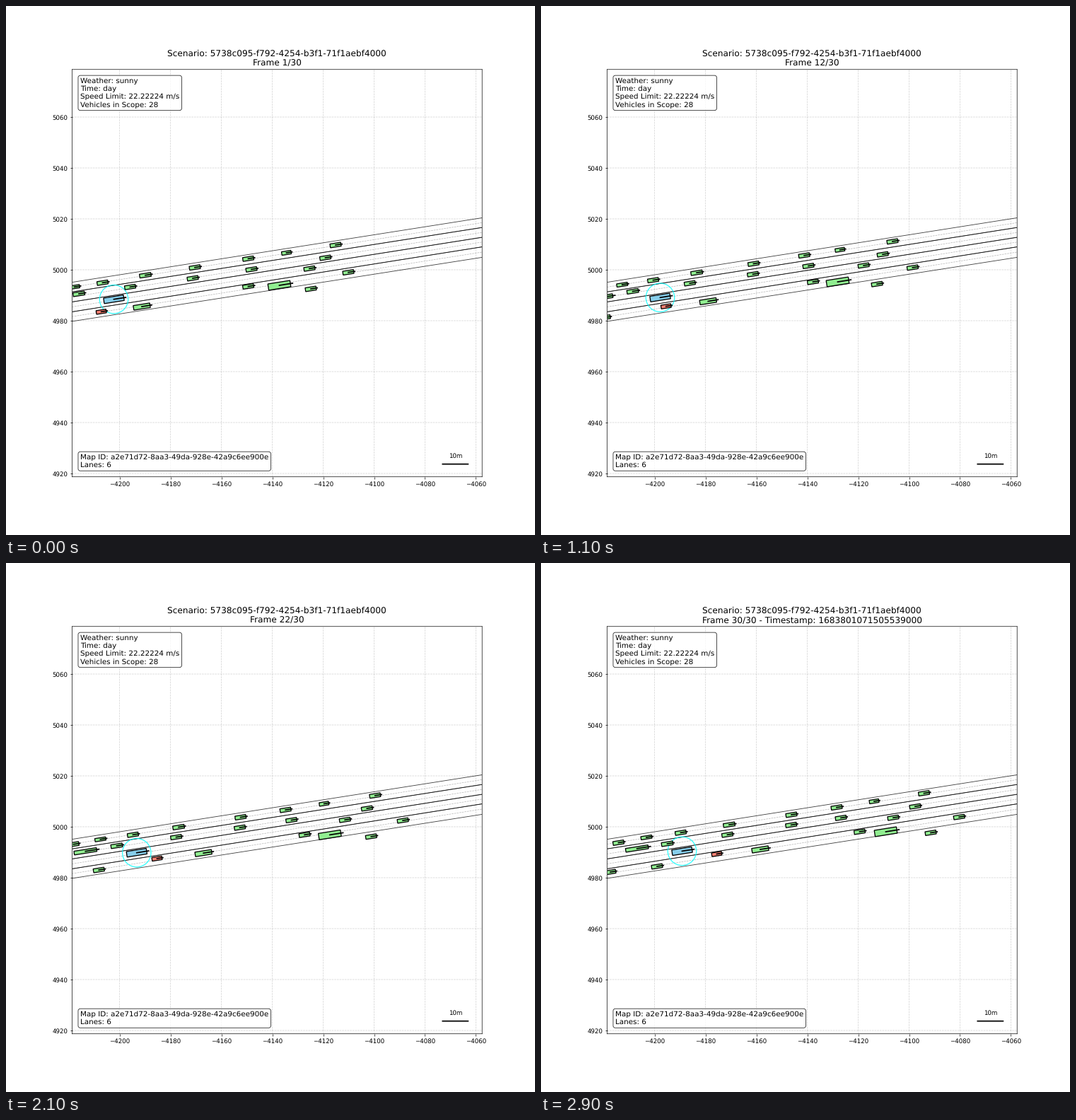
A matplotlib script that plays this animation: 748x748 px, repeating every 3000 ms.

```python
import numpy as np
import matplotlib.pyplot as plt
from matplotlib.animation import FuncAnimation
from matplotlib.patches import Circle, Polygon

plt.rcParams.update({
    "font.family": "DejaVu Sans",
    "text.hinting": "no_hinting",
    "path.snap": False,
})

SIZE = 748
FRAMES = 30
CENTER = (-4138.1, 4998.68)
SCALE = SIZE * 0.77 / 160            # pixels per metre
HALF_W = SIZE * 0.775 / 2 / SCALE
HALF_H = 80
HEADING = np.radians(9)

# length and width in pixels, fill colour
KINDS = {
    "car": (15.4, 5.4, "lightgreen"),
    "long": (16.2, 5.4, "lightgreen"),
    "small": (13.4, 5.0, "lightgreen"),
    "flat": (15.4, 4.6, "lightgreen"),
    "van": (23.6, 6.5, "lightgreen"),
    "truck": (31.6, 9.0, "lightgreen"),
    "lorry": (32.2, 5.3, "lightgreen"),
    "red": (14.2, 5.2, "salmon"),
    "ego": (28.5, 7.9, "skyblue"),
}

# x on the stage at the key frames, y at the start and the end
KEYS = (0, 8, 18, 29)
LANE_1 = [
    ("car", (466, 489, 514.5, 541.5), (338, 325.6)),
    ("small", (396.5, 415, 441.5, 471), (349, 337)),
    ("car", (342.5, 365, 388, 418), (357.3, 345.6)),
    ("car", (267, 291, 322.5, 354), (369.7, 356)),
    ("long", (197, 213.5, 236.5, 266), (380.7, 370.1)),
    ("car", (136.5, 152.5, 173, 197.5), (391.3, 381.3)),
    ("flat", (96.5, 109.5, 127.7, 149), (397.3, 388)),
    ("car", (69, 78.5, 91, 109.5), (402, 395.5)),
]
LANE_2 = [
    ("car", (451.5, 474.5, 502.5, 529), (356, 344.2)),
    ("car", (347, 370, 396, 424), (372.4, 360.4)),
    ("car", (264, 290, 321.5, 353.7), (385, 370.4)),
    ("car", (175.5, 201, 231.7, 263.5), (397.3, 384.2)),
    ("long", (103, 122, 148.3, 178.5), (407, 397)),
    ("lorry", (59, 78, 104, 135.7), (416.5, 403.8)),
]
LANE_3 = [
    ("car", (429, 449, 472.3, 498), (371.3, 360.2)),
    ("ego", (152.5, 164, 179.7, 199.5), (414.7, 407.4)),
]
LANE_4 = [
    ("car", (484, 514.5, 550.3, 591.2), (376.6, 359.2)),
    ("car", (431, 463, 503.7, 551), (400, 381.5)),
    ("car", (342.5, 373, 411, 450.5), (396.5, 380)),
    ("truck", (375.7, 407.7, 446.5, 487.5), (396.6, 380)),
    ("van", (192, 223.5, 266.5, 310), (425, 405)),
    ("red", (134.7, 166, 202, 248.5), (432.3, 411.5)),
    ("car", (45, 78, 119, 164), (447.5, 429)),
    ("car", (-25, 9, 51, 98), (456, 437)),
]


def to_map(px, py):
    """Stage pixels to map metres."""
    x = CENTER[0] - HALF_W + (px - SIZE * 0.125) / SCALE
    y = CENTER[1] + HALF_H - (py - SIZE * 0.12) / SCALE
    return x, y


class Vehicle:
    def __init__(self, ax, kind, xs, ys):
        length, width, color = KINDS[kind]
        self.kind, self.xs, self.ys = kind, xs, ys
        self.path = np.polyfit(KEYS, xs, 3)
        self.ahead = np.array([np.cos(HEADING), np.sin(HEADING)])
        side = np.array([-self.ahead[1], self.ahead[0]])
        self.reach = self.ahead * 0.6 * length / SCALE
        a = self.ahead * length / 2 / SCALE
        b = side * width / 2 / SCALE
        self.corners = np.array([a + b, a - b, -a - b, -a + b])
        self.body = Polygon(self.corners, fc=color, ec="black", lw=1.5, zorder=5)
        ax.add_patch(self.body)
        self.nose, = ax.plot([], [], color="black", lw=2, zorder=6)
        self.ring = None
        if kind == "ego":
            self.ring = Circle((0, 0), 20.2 / SCALE, fill=False, ec="cyan",
                               lw=1.5, alpha=0.8, zorder=4)
            ax.add_patch(self.ring)

    def move(self, t):
        px = np.polyval(self.path, t)
        if self.kind == "truck":
            px += 10.8 * max(0, 1 - t / 4)   # slow start
        share = (px - self.xs[0]) / (self.xs[-1] - self.xs[0])
        py = self.ys[0] + share * (self.ys[1] - self.ys[0])
        pos = np.array(to_map(px, py))
        self.body.set_xy(self.corners + pos)
        tip = pos + self.reach
        self.nose.set_data([pos[0], tip[0]], [pos[1], tip[1]])
        if self.ring:
            self.ring.center = pos


def draw_road(ax):
    def line(left, right, **style):
        x, y = to_map(np.array([93.5, 673.2]), np.array([left, right]))
        ax.plot(x, y, **style)

    edges = [(390.6, 299.5), (404.2, 313.2), (418.4, 327.1),
             (432.4, 340.6), (445.9, 355.4)]
    for upper, lower in zip(edges, edges[1:]):
        # shared borders are drawn twice and come out darker
        for left, right in (upper, lower):
            line(left, right, color="black", lw=1, alpha=0.75, zorder=2)
        mid = np.add(upper, lower) / 2
        line(*mid, color="gray", lw=0.8, ls="--", alpha=0.6, zorder=2)


def draw_labels(ax):
    box = dict(boxstyle="round", facecolor="white", alpha=0.8)
    ax.text(0.02, 0.98, "Weather: sunny\nTime: day\n"
            "Speed Limit: 22.22224 m/s\nVehicles in Scope: 28",
            transform=ax.transAxes, fontsize=12, va="top", bbox=box, zorder=8)
    ax.text(0.02, 0.02, "Map ID: a2e71d72-8aa3-49da-928e-42a9c6ee900e\nLanes: 6",
            transform=ax.transAxes, fontsize=12, va="bottom", bbox=box, zorder=8)
    x, y = CENTER[0] + 65, CENTER[1] - 75
    ax.plot([x, x + 10], [y, y], color="black", lw=2)
    ax.text(x + 5, y + 2, "10m", ha="center", va="bottom", fontsize=10)


fig, ax = plt.subplots(figsize=(12, 12), dpi=SIZE / 12)
ax.set_xticks(range(-4200, -4059, 20))
ax.set_yticks(range(4920, 5061, 20))
ax.grid(True, ls="--", alpha=0.6)
draw_road(ax)
draw_labels(ax)
vehicles = [Vehicle(ax, *v) for v in LANE_1 + LANE_2 + LANE_3 + LANE_4]
ax.set_xlim(CENTER[0] - HALF_W, CENTER[0] + HALF_W)
ax.set_ylim(CENTER[1] - HALF_H, CENTER[1] + HALF_H)
title = ax.set_title("", fontsize=14)


def update(i):
    text = f"Scenario: 5738c095-f792-4254-b3f1-71f1aebf4000\nFrame {i + 1}/{FRAMES}"
    if i == FRAMES - 1:
        text += " - Timestamp: 1683801071505539000"
    title.set_text(text)
    for vehicle in vehicles:
        vehicle.move(i)
    return []


anim = FuncAnimation(fig, update, frames=FRAMES, interval=100,
                     repeat=True, repeat_delay=0, blit=False)
plt.show()
```
